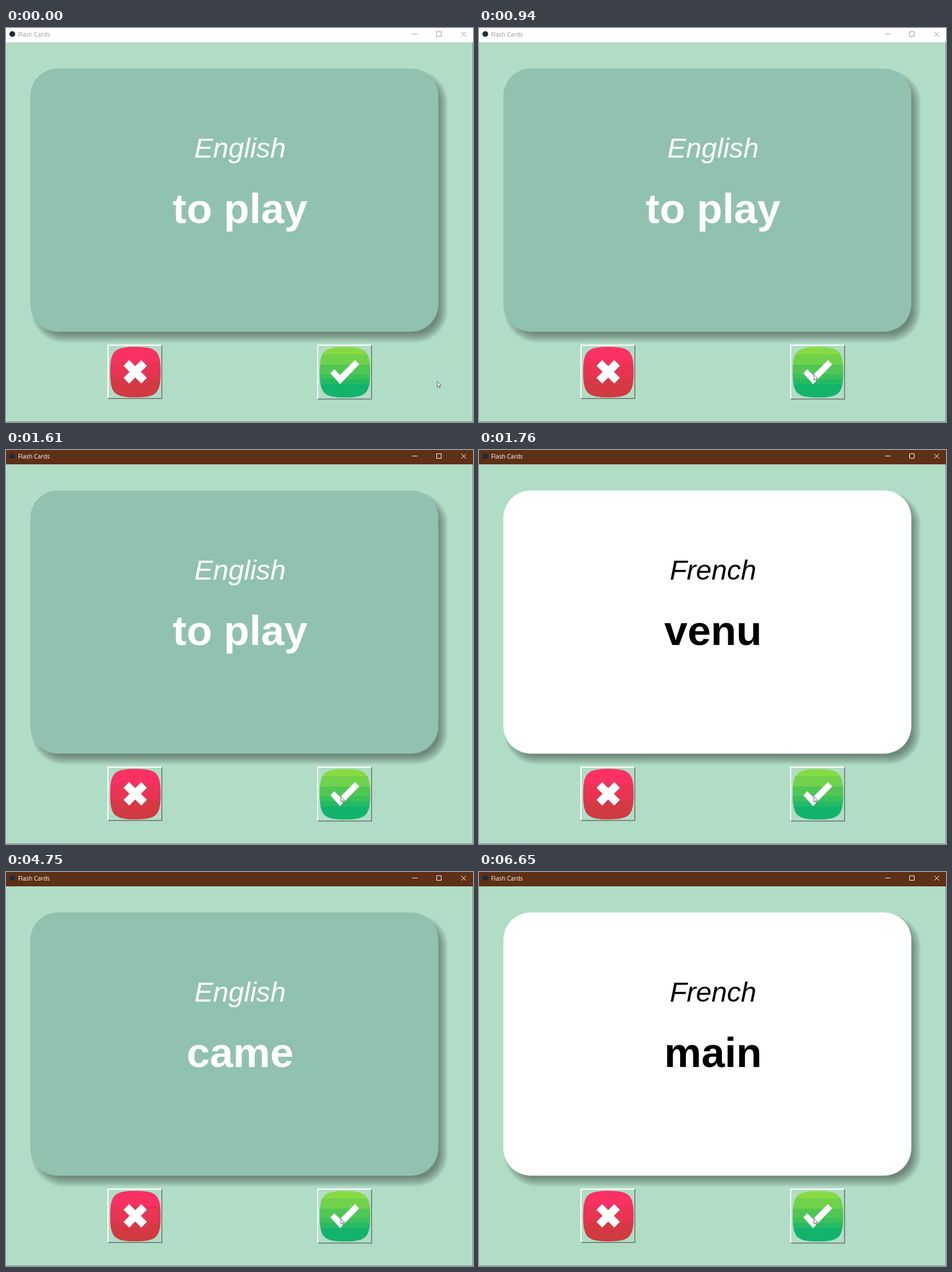
An HTML page that plays this animation: 815x687 px, repeating every 8000 ms.

```html
<!DOCTYPE html>
<html lang="en">
<head>
<meta charset="utf-8">
<title>Flash Cards</title>
<style>
  html, body { margin: 0; width: 100%; height: 100%; overflow: hidden; background: #b1ddc6; }
  svg { display: block; }
  .card { font-family: "Liberation Sans", Arial, sans-serif; text-anchor: middle; }
  .bar { font-family: "Open Sans", "Noto Sans", sans-serif; }
</style>
</head>
<body>
<svg width="815" height="687" viewBox="0 0 815 687">
  <defs>
    <linearGradient id="red" x2="0" y2="1">
      <stop offset="0" stop-color="#fb3164"/>
      <stop offset=".3" stop-color="#f93161"/>
      <stop offset=".3" stop-color="#ec3357"/>
      <stop offset=".62" stop-color="#e63450"/>
      <stop offset=".62" stop-color="#d93847"/>
      <stop offset="1" stop-color="#cd3b3e"/>
    </linearGradient>
    <linearGradient id="smooth" x2="0" y2="1">
      <stop offset="0" stop-color="#8fdb3f"/>
      <stop offset=".5" stop-color="#4cc658"/>
      <stop offset=".82" stop-color="#0cb36e"/>
      <stop offset="1" stop-color="#09b170"/>
    </linearGradient>
    <linearGradient id="bands" x2="0" y2="1"></linearGradient>
    <path id="blob" d="M-44 0C-44-37-37-44 0-44S44-37 44 0 37 44 0 44-44 37-44 0Z"/>
  </defs>

  <rect width="815" height="687" fill="#b1ddc6"/>
  <g id="shadow"></g>
  <rect id="face" x="42.5" y="70.5" width="712" height="459" rx="48"/>
  <g id="words" class="card">
    <text id="lang" x="408.5" y="226" font-size="48.6" font-style="italic"></text>
    <text id="word" x="408.5" y="339.5" font-size="73" font-weight="bold"></text>
  </g>

  <g>
    <path d="M177 552h96l-2 2h-92v91l-2 2z" fill="#fff"/>
    <path d="M273 552v95h-96l2-2h92v-91z" fill="#7c8983"/>
    <use href="#blob" x="225.8" y="600" fill="url(#red)"/>
    <path d="M210 584l31 31m0-31l-31 31" stroke="#fff" stroke-width="14"/>
  </g>

  <g>
    <path id="lit" d="M543 552h96l-2 2h-92v92l-2 2z"/>
    <path id="dim" d="M639 552v96h-96l2-2h92v-92z"/>
    <g id="tick">
      <use id="leaf" href="#blob" x="591.5" y="600.3"/>
      <path d="M566 602l7-7 10 10 26-26 7.5 7.5L583 621z" fill="#fff"/>
    </g>
  </g>

  <rect id="bar" width="815" height="25"/>
  <circle cx="11" cy="10.5" r="5" fill="#1d2c3c"/>
  <text id="name" class="bar" x="21" y="15" font-size="10.4">Flash Cards</text>
  <path id="ctl" d="M709 10.5h9M751.5 6.5h8v8h-8zM794.5 6.5l8.5 8.5m0-8.5l-8.5 8.5" fill="none"/>
  <path d="M814.5 25V686.5H0" fill="none" stroke="#75877f"/>
  <path id="mouse" d="M0 0V9.4L2.2 7.4 3.7 10.8 5.2 10.2 3.8 6.9H6.8Z" fill="#fff" stroke="#3a3f3d" stroke-width=".8"/>
</svg>
<script>
const $ = id => document.getElementById(id);
const NS = "http://www.w3.org/2000/svg";

function add(parent, tag, attrs) {
  const el = document.createElementNS(NS, tag);
  set(el, attrs);
  parent.append(el);
}

function set(el, attrs) {
  for (const key in attrs) el.setAttribute(key, attrs[key]);
}

// Soft shadow built from nested translucent cards
for (let i = 0; i < 9; i++) {
  const grow = 8 - 2 * i;
  add($("shadow"), "rect", {
    x: 52 - grow, y: 81.5 - grow, width: 711 + 2 * grow, height: 459 + 2 * grow,
    rx: 48 + grow, "fill-opacity": .052
  });
}

// Hard colour bands of the raised green button
const bands = [[0, "#88da42"], [.15, "#70d24b"], [.35, "#50c754"],
  [.53, "#3cc15a"], [.63, "#25ba62"], [.73, "#12b46b"], [1, "#12b46b"]];
bands.forEach(([at, color], i) => {
  if (i) add($("bands"), "stop", { offset: at, "stop-color": bands[i - 1][1] });
  add($("bands"), "stop", { offset: at, "stop-color": color });
});

const LOOP = 8000;
const cards = [
  [0, "English", "to play"],
  [1760, "French", "venu"],
  [4750, "English", "came"],
  [6650, "French", "main"]
];

function draw(t) {
  const [, lang, word] = cards.filter(c => c[0] <= t).pop();
  const front = lang === "French";
  set($("face"), { fill: front ? "#fff" : "#91c2af" });
  set($("words"), { fill: front ? "#000" : "#fff" });
  $("lang").textContent = lang;
  $("word").textContent = word;

  const active = t >= 1610;
  set($("bar"), { fill: active ? "#5e3016" : "#fff" });
  set($("name"), { fill: active ? "#fff" : "#999" });
  set($("ctl"), { stroke: active ? "#fff" : "#999" });

  const down = (t >= 1640 && t < 1760) || (t >= 6250 && t < 6650);
  set($("lit"), { fill: down ? "#7c8983" : "#fff" });
  set($("dim"), { fill: down ? "#fff" : "#7c8983" });
  set($("leaf"), { fill: down ? "url(#smooth)" : "url(#bands)" });
  set($("tick"), { transform: down ? "translate(1 1)" : "" });

  // The pointer moves in 13 steps of 30 ms
  const step = Math.min(13, Math.max(0, Math.floor((t - 550) / 30)));
  const p = step / 13, ease = p * p * (3 - 2 * p);
  const x = Math.round(752 - 168 * ease) + .5;
  const y = Math.round(616 - 12 * ease) + .5;
  set($("mouse"), { transform: `translate(${x} ${y})` });
}

const start = performance.now();
function tick(now) {
  draw(Math.max(0, now - start) % LOOP);
  requestAnimationFrame(tick);
}
draw(0);
requestAnimationFrame(tick);
</script>
</body>
</html>
```
